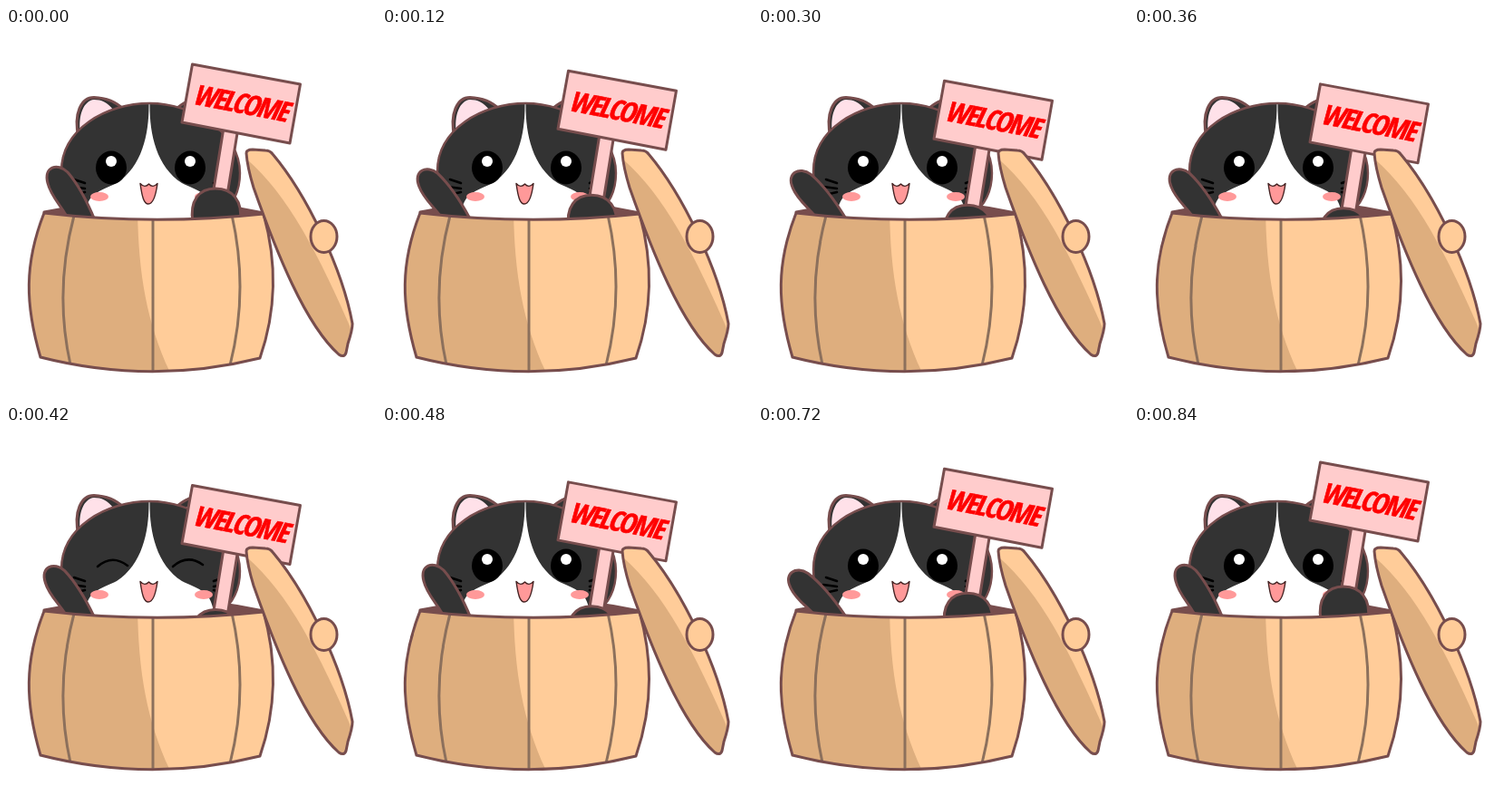
An HTML page that plays this animation: 408x408 px, repeating every 900 ms.

```html
<!DOCTYPE html>
<html lang="en">
<head>
<meta charset="utf-8">
<title>Welcome cat</title>
<style>
  html, body { margin: 0; height: 100%; overflow: hidden; background: #fff; }
  svg { display: block; width: 408px; height: 408px; }
  .ink { stroke: #774d4d; stroke-width: 3; stroke-linejoin: round; }
  .fur { fill: #333; }
  .wood { fill: #fc9; }
  .shade { fill: #deae7e; }
  .pink { fill: #fcc; }
  .line { fill: none; stroke: #000; stroke-width: 2.6; stroke-linecap: round; }
  .stave { fill: none; stroke: #8c705c; stroke-width: 3; }
  text {
    font: italic 700 24px "Noto Sans ExtraCondensed", "Open Sans Condensed", "Roboto Condensed", Roboto, sans-serif;
    font-stretch: 62.5%; letter-spacing: -.07em; fill: #f00; stroke: #f00; stroke-width: .6; text-anchor: middle;
  }
</style>
</head>
<body>
<svg viewBox="0 0 408 408">
  <defs>
    <path id="headShape" d="M158.500 83C110 83 61 112 61 158C61 196 85 226 158.500 226S258 196 258 160C258 114 205 83 158.500 83Z"/>
    <path id="barrelShape" d="M42 204Q162 218 284 205C300 262 297 315 280 364Q160 394 38 363C21 305 20 260 42 204Z"/>
    <path id="lidShape" d="M265 138Q265 134 272 134L286 135Q291 135 294 139C332 184 371 266 382 326Q382 333 377 348L375 358Q373 364 367 360C330 327 298 247 273 176Q266 153 265 138Z"/>
    <clipPath id="headClip"><use href="#headShape"/></clipPath>
    <clipPath id="barrelClip"><use href="#barrelShape"/></clipPath>
    <clipPath id="lidClip"><use href="#lidShape"/></clipPath>
    <g id="ear">
      <path class="fur ink" d="M80 121C74 94 83 76.500 97 76.500C111 77 122 82 130 90L110 116Z"/>
      <path fill="#ffe1e9" d="M82 116C79 96 86 80 97 79C105 79 112 82 118 90Q94 99 82 116Z"/>
    </g>
    <g id="side">
      <path class="fur" d="M157.500 82C158 115 151 152 122 171C106 179 92 181 88 200L40 202V60Z"/>
      <path class="line" d="M75 167L87 171M72 175L87 177M74 184L87 181"/>
    </g>
    <g id="eye"><ellipse rx="17" ry="18.500"/><circle cy="-7" r="6" fill="#fff"/></g>
  </defs>

  <path class="ink" d="M42 203Q162 178 284 204Q162 218 42 203Z" fill="#774d4d"/>
  <use href="#ear"/>
  <use href="#ear" transform="matrix(-1 0 0 1 317 0)"/>
  <use href="#headShape" fill="#fff"/>
  <g clip-path="url(#headClip)">
    <use href="#side"/>
    <use href="#side" transform="matrix(-1 0 0 1 316 0)"/>
  </g>
  <use href="#headShape" class="ink" fill="none" style="stroke-width:2.4"/>
  <g fill="#f99">
    <ellipse cx="103" cy="186" rx="10" ry="5"/>
    <ellipse cx="218" cy="186" rx="10" ry="5"/>
  </g>
  <g id="open">
    <use href="#eye" x="116" y="154"/>
    <use href="#eye" x="203" y="154"/>
  </g>
  <path id="closed" class="line" d="M101 155Q117 141 134 154M184 155Q200 141 217 153"/>
  <path d="M148 171.500Q153 177 157.500 172Q162 177 167 171.500C165 186 162 194 157 194S150 186 148 171.500Z" fill="#f99" stroke="#422" stroke-width="1.400" stroke-linejoin="round"/>

  <path id="paw" class="fur ink" d="M46 171C41 153 57 148 68 159C80 173 89 190 98 212L71 216C64 198 50 188 46 171Z"/>
  <g id="sign">
    <path class="pink ink" d="M240 110L228 184H244L256 110Z"/>
    <path class="pink ink" d="M205.500 40L324.500 62L313 127L194 104Z"/>
    <text id="label" transform="translate(258 82.500) rotate(11)" dy=".36em">WELCOME</text>
    <path class="fur ink" d="M206 215C202 190 213 177 231 177S262 190 258 215Z"/>
  </g>

  <use href="#barrelShape" class="wood"/>
  <g clip-path="url(#barrelClip)">
    <path class="shade" d="M0 190H145C145 265 154 325 183 384H0Z"/>
    <path class="stave" d="M75 207Q53 290 71 371M162 210V382M249 206Q268 290 247 372"/>
  </g>
  <use href="#barrelShape" class="ink" fill="none"/>
  <use href="#lidShape" class="wood"/>
  <path class="shade" clip-path="url(#lidClip)" d="M260 140C310 180 345 250 384 340V370H260Z"/>
  <use href="#lidShape" class="ink" fill="none"/>
  <ellipse class="wood ink" cx="350.500" cy="230" rx="14.500" ry="17.500"/>
</svg>
<script>
  const STEP = 60, STEPS = 15, MIDDLE = 7;
  const $ = id => document.getElementById(id);
  const show = (id, on) => $(id).setAttribute("visibility", on ? "visible" : "hidden");

  // Choose the type size at which the word fills the board.
  const label = $("label");
  label.style.fontSize = `${24 * 104 / label.getComputedTextLength()}px`;

  // Two waves of the paw; the last swing back is twice as fast.
  const wave = k => k <= 12 ? 1 - Math.abs(k % 8 - 4) / 4 : (14 - k) / 2;

  function draw(now) {
    const k = Math.floor(now / STEP) % STEPS;
    const drop = 25.500 * (1 - Math.abs(k - MIDDLE) / MIDDLE);
    const blink = k === MIDDLE;
    $("sign").setAttribute("transform", `translate(0 ${drop})`);
    $("paw").setAttribute("transform", `rotate(${-12 * wave(k)} 78 222)`);
    show("open", !blink);
    show("closed", blink);
    requestAnimationFrame(draw);
  }
  draw(performance.now());
</script>
</body>
</html>
```
